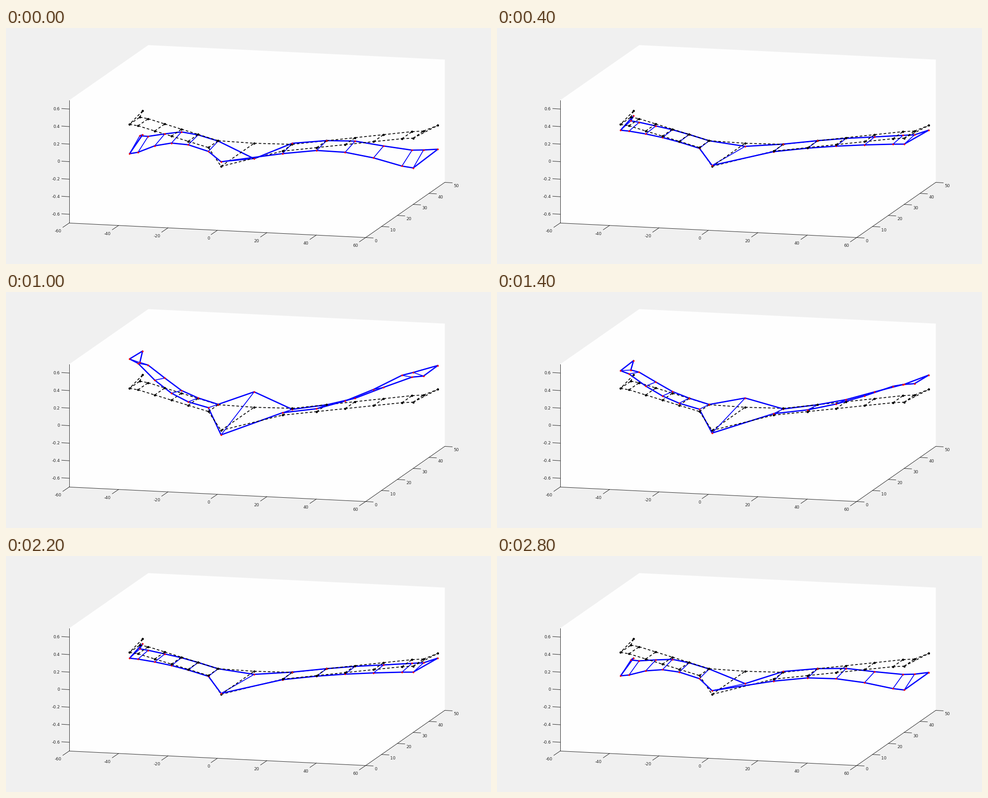
Write a matplotlib script that moves like this. It is 1073 px wide and 522 px high and loops after 3 s.

```python
import numpy as np
import matplotlib.pyplot as plt
from matplotlib.animation import FuncAnimation

W, H, DPI = 1073, 522, 64
PX = 72 / DPI  # points per pixel
STEPS, RISE = 15, 5
INK = "#262626"

# Orthographic view: screen origin and the screen step per unit of x, y, z
ORIGIN = np.array([468.2, 312])
VIEW = np.array([[5.467, 0.267], [3.5, -2.44], [0, -194]])
X_MAX, Y_MAX, Z_MAX = 60, 50, 0.7

# Half-span stations and the wing's outline and bending at key stations
STATIONS = np.array([0, 15, *np.linspace(26, 53.4, 4), 57.4])
KEYS = STATIONS[[0, 1, -2, -1]]
LEAD_Y, TRAIL_Y = [2.3, 17.7, 33.2, 34.1], [23.2, 23.9, 39.6, 40.6]
LEAD_BEND = [-0.052, 0.036, 0.036, 0.083, 0.177, 0.307, 0.337]
TRAIL_BEND = [0.176, -0.004, 0.002, 0.035, 0.121, 0.206, 0.214]
TIP_X, TIP_Y, TIP_BEND = 59.75, 46, 0.272

plt.rcParams["font.family"] = "DejaVu Sans"


def project(x, y, z):
    return ORIGIN + np.stack([x, y, z], axis=-1) @ VIEW


def spar(outline, bend):
    """Nodes x, y and bending of one spar, mirrored, with a slight skew."""
    x = np.r_[-STATIONS[:0:-1], STATIONS]
    y = np.interp(abs(x), KEYS, outline)
    skew = -0.008 * np.sin(2 * np.pi * x / 60)
    return np.c_[x, y, np.interp(abs(x), STATIONS, bend) + skew]


lead, trail = spar(LEAD_Y, LEAD_BEND), spar(TRAIL_Y, TRAIL_BEND)
tips = [(-TIP_X, TIP_Y, TIP_BEND), (TIP_X, TIP_Y, TIP_BEND)]
X, Y, BEND = np.vstack([lead, trail, tips]).T

n = len(lead)
left, right = 2 * n, 2 * n + 1
chains = [left, *range(n), right], [left, *range(n, 2 * n), right]
rungs = [(i, i + n) for i in range(n)]
edges = rungs + [pair for c in chains for pair in zip(c, c[1:])]

fig = plt.figure(figsize=(W / DPI, H / DPI), dpi=DPI, facecolor="#f0f0f0")
ax = fig.add_axes([0, 0, 1, 1])
ax.set_xlim(0.4, W + 0.4)
ax.set_ylim(H + 0.4, 0.4)
ax.axis("off")


def line(points, color, width, **kw):
    return ax.plot(*np.transpose(points), color=color, lw=width * PX, **kw)[0]


def dot(point, color, size, z=6):
    return ax.plot(*np.reshape(point, (2, 1)), "o", color=color,
                   ms=size * PX, mew=0, zorder=z)[0]


def ticks(values, place, tick, offset, ha):
    for v in values:
        p = project(*place(v))
        line([p, p + tick], INK, 1, zorder=1)
        ax.text(*(p + offset), f"{v:g}", ha=ha, va="center_baseline",
                color=INK, fontsize=9.2 * PX)


def draw_box():
    x, y, z = X_MAX, Y_MAX, Z_MAX
    corners = [project(*c) for c in [(-x, 0, z), (-x, y, z), (x, y, z),
                                     (x, y, -z), (x, 0, -z), (-x, 0, -z)]]
    ax.add_patch(plt.Polygon(corners, fc="#fefefe", ec="none", zorder=0))
    line([corners[0], corners[5]], INK, 1, zorder=1)
    line(corners[3:], INK, 1, zorder=1)
    ticks(np.arange(-3, 4) / 5, lambda v: (-x, 0, v),
          (-16.5, -1), (-20.5, -0.7), "right")
    ticks(range(-60, 61, 20), lambda v: (v, 0, -z),
          (-14, 9.5), (-17, 17.3), "right")
    ticks(range(0, 51, 10), lambda v: (x, v, -z),
          (16.5, 1), (19.5, 7.2), "left")


draw_box()
rest = project(X, Y, 0 * X)
for a, b in edges:
    line(rest[[a, b]], "black", 1.8, zorder=3, dashes=(3.2, 2.4),
         dash_capstyle="butt")
for p in rest:
    dot(p, "black", 5)

bars = [line(rest[[a, b]], "blue", 1.8 if i < n else 2.8,
             solid_capstyle="round") for i, (a, b) in enumerate(edges)]
joints = [dot(p, "red", 3.8) for p in rest]


def phase(k):
    """Fast rise from -1 to 1, then a slower fall back."""
    return np.interp(k, [0, RISE, STEPS], [-1, 1, -1])


def update(k):
    lift = phase(k) * BEND
    ys = project(X, Y, lift)[:, 1]
    # Parts raised above their rest pose lie nearer the viewer
    for bar, (a, b) in zip(bars, edges):
        bar.set_ydata([ys[a], ys[b]])
        bar.set_zorder(4 if lift[a] + lift[b] > 0 else 2)
    for joint, y, up in zip(joints, ys, lift):
        joint.set_ydata([y])
        joint.set_zorder(7 if up > 0 else 5)
    return bars + joints


anim = FuncAnimation(fig, update, frames=STEPS, interval=200,
                     repeat=True, repeat_delay=0, blit=False)
plt.show()
```
